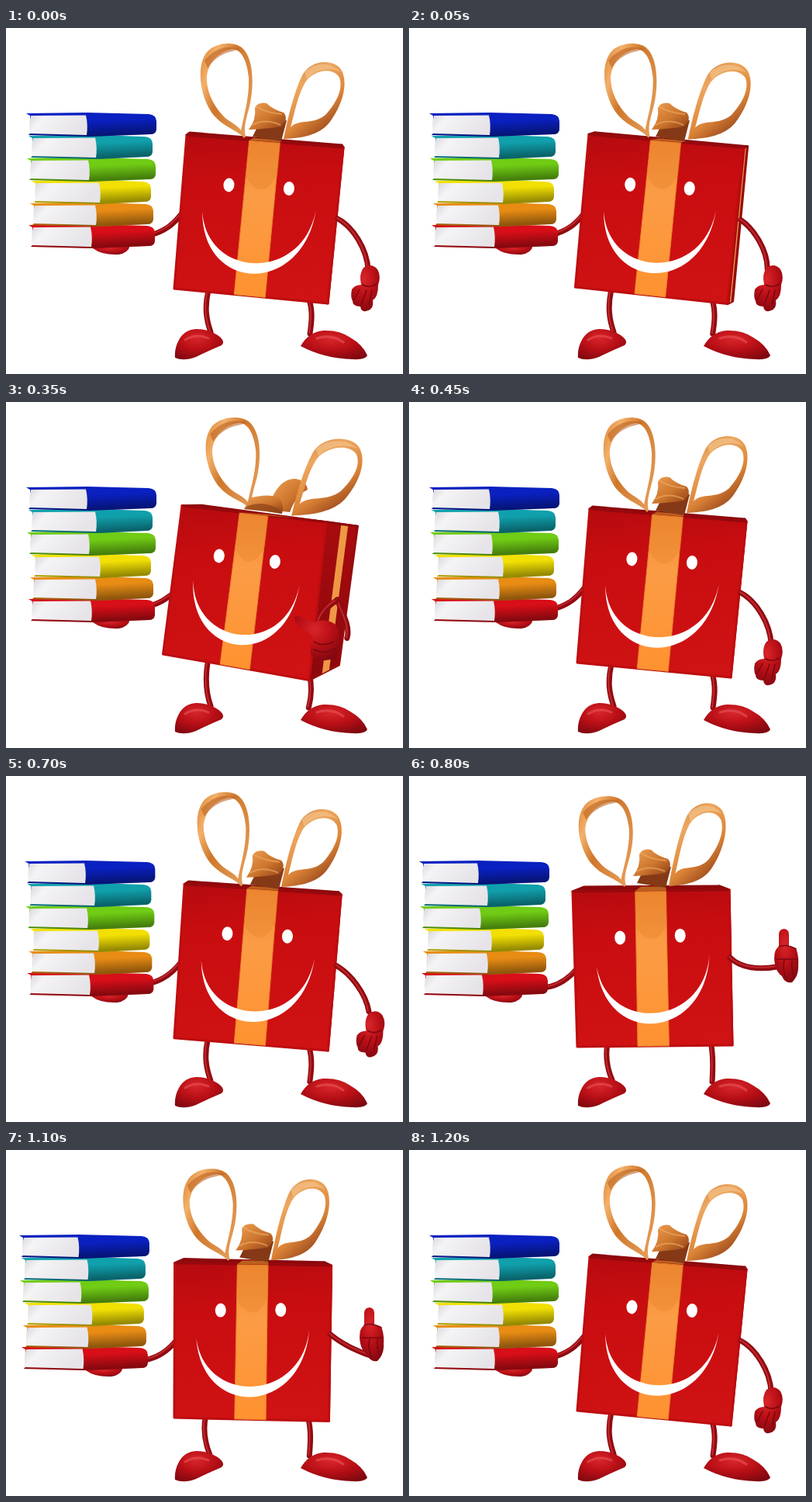
Recreate the animation shown at these times as an HTML page. Size 512 px wide and 446 px high, loop 1850 ms.

```html
<!DOCTYPE html>
<html lang="en">
<head>
<meta charset="utf-8">
<title>Gift box with books</title>
<style>
html, body { margin: 0; width: 100%; height: 100%; overflow: hidden; background: #fff; }
svg { display: block; width: 100vw; height: 100vh; }
</style>
</head>
<body>
<svg viewBox="0 0 512 446">
  <defs>
    <linearGradient id="front" x1="0" y1="0" x2=".1" y2="1">
      <stop offset="0" stop-color="#b50b0f"/><stop offset=".3" stop-color="#c80d10"/><stop offset="1" stop-color="#cf1213"/>
    </linearGradient>
    <linearGradient id="side" x1="0" y1="0" x2="0" y2="1">
      <stop offset="0" stop-color="#a80b0e"/><stop offset="1" stop-color="#8c080b"/>
    </linearGradient>
    <linearGradient id="band" x1="0" y1="0" x2="0" y2="1">
      <stop offset="0" stop-color="#f08a32"/><stop offset=".35" stop-color="#fb9c46"/><stop offset="1" stop-color="#ff9230"/>
    </linearGradient>
    <linearGradient id="loopL" x1="0" y1="0" x2="1" y2=".7">
      <stop offset="0" stop-color="#d9822f"/><stop offset=".25" stop-color="#f3b06a"/><stop offset=".5" stop-color="#cf772b"/><stop offset="1" stop-color="#e39a55"/>
    </linearGradient>
    <linearGradient id="loopR" x1="0" y1="0" x2=".6" y2="1">
      <stop offset="0" stop-color="#c87a34"/><stop offset=".35" stop-color="#eda75f"/><stop offset=".7" stop-color="#dc8538"/><stop offset="1" stop-color="#96441a"/>
    </linearGradient>
    <linearGradient id="knot" x1="0" y1="0" x2="1" y2="1">
      <stop offset="0" stop-color="#eea052"/><stop offset=".55" stop-color="#cc752d"/><stop offset="1" stop-color="#8e3d16"/>
    </linearGradient>
    <linearGradient id="pages" x1="0" y1="0" x2="1" y2=".3">
      <stop offset="0" stop-color="#d9d7dc"/><stop offset=".25" stop-color="#f4f3f5"/><stop offset="1" stop-color="#e6e4e8"/>
    </linearGradient>
    <linearGradient id="shade" x1="0" y1="0" x2=".25" y2="1">
      <stop offset=".45" stop-opacity="0"/><stop offset="1" stop-opacity=".38"/>
    </linearGradient>
    <radialGradient id="skin" cx=".45" cy=".3" r=".75">
      <stop offset="0" stop-color="#d8262a"/><stop offset=".5" stop-color="#b90f16"/><stop offset="1" stop-color="#800810"/>
    </radialGradient>
  </defs>
  <g id="scene"></g>
</svg>
<script>
const LOOP = 1850, STEP = 50;
const scene = document.getElementById('scene');

// box: front corners clockwise, back top corners, back lower right
const rest = {
  box: [233,138, 435,154, 415,355, 217,336, 237,135, 433,151, 415,355],
  armL: [226,240, 216,253, 205,262, 186,267],
  armR: [428,246, 447,256, 466,285, 467,312],
  hand: [0,0], knot: [0,0], books: [0,0],
  loopL: [250,20, 317,142], loopR: [358,43, 436,143],
  legL: [261,338, 256,360, 258,375, 264,392],
  legR: [391,350, 396,366, 394,380, 392,394]
};
const turned = {
  ...rest,
  box: [226,133, 409,155, 387,359, 200,323, 255,133, 457,162, 432,336],
  armL: [211,250, 204,254, 199,258, 186,262],
  armR: [427,256, 430,272, 441,290, 435,303],
  loopL: [258,20, 328,138], loopR: [370,47, 463,147],
  legL: [260,335, 257,355, 258,375, 264,392],
  legR: [391,350, 395,366, 394,380, 390,394]
};
const thumb = {
  box: [211,149, 413,147, 417,347, 217,349, 226,143, 400,142, 417,347],
  armL: [216,249, 205,262, 190,272, 172,273],
  armR: [414,234, 428,248, 452,250, 474,246],
  hand: [50,-20], knot: [-24,-2], books: [-13,-15],
  loopL: [218,26, 288,143], loopR: [335,34, 408,142],
  legL: [256,345, 253,362, 256,378, 262,392],
  legR: [389,343, 393,360, 392,378, 391,394]
};

// start time, share of the turned pose, share of the thumb pose
const keys = [
  [0,0,0], [50,.15,0], [100,.6,0], [150,1,0], [350,.85,0], [400,.4,0], [450,0,0],
  [700,0,.13], [750,0,.6], [800,0,1], [1050,0,.99], [1100,0,.7], [1150,0,.25], [1200,0,0]
];

// left, page end, right, top, colour
const books = [
  [29,111,192,254,'#d80e18'], [31,117,190,226,'#e88c14'], [33,122,187,197,'#f2e004'],
  [27,108,193,168,'#70cc14'], [29,117,189,139,'#10a0ac'], [26,105,194,110,'#0a20c0']
];

const mix = (a, b, k) => a + (b - a) * k;
const path = (d, fill, more = '') => `<path d="${d}" fill="${fill}" ${more}/>`;
const poly = (pts, fill, more = '') => path('M' + pts.join('L') + 'Z', fill, more);
const curve = p => `M${p[0]} ${p[1]}C${p.slice(2)}`;
const limb = p => path(curve(p), 'none', 'stroke="#8f0b12" stroke-width="7" stroke-linecap="round"')
  + path(curve(p), 'none', 'stroke="#c3262b" stroke-width="2" stroke-linecap="round" transform="translate(-1 -1)"');
const move = ([x, y], s) => `<g transform="translate(${x} ${y})">${s}</g>`;

function fit(from, to, s) {
  const sx = (to[2] - to[0]) / (from[2] - from[0]);
  const sy = (to[3] - to[1]) / (from[3] - from[1]);
  return `<g transform="translate(${to[0]} ${to[1]}) scale(${sx} ${sy}) translate(${-from[0]} ${-from[1]})">${s}</g>`;
}

function poseAt(b, c) {
  const out = {};
  for (const k in rest)
    out[k] = rest[k].map((v, i) => v + (turned[k][i] - v) * b + (thumb[k][i] - v) * c);
  return out;
}

function book([l, s, r, y, col], [dx, ds]) {
  l += dx; r += dx; s += ds;
  const cover = `M${l} ${y}L${s} ${y - 1}L${r - 10} ${y + 1}Q${r} ${y + 2} ${r} ${y + 10}V${y + 21}Q${r - 1} ${y + 27} ${r - 8} ${y + 27}L${s + 2} ${y + 30}L${l + 3} ${y + 28}L${l + 5} ${y + 26}V${y + 3}Z`;
  const page = `M${l + 6} ${y + 3}L${s - 2} ${y + 2.5}Q${s + 1} ${y + 15} ${s - 1} ${y + 28}L${l + 5} ${y + 26}Q${l + 3} ${y + 14} ${l + 6} ${y + 3}Z`;
  return path(cover, col) + path(cover, 'url(#shade)') + path(page, 'url(#pages)');
}

function gift(q) {
  const p = [];
  for (let i = 0; i < q.length; i += 2) p.push([q[i], q[i + 1]]);
  const [tl, tr, br, bl, backL, backR, low] = p;
  const on = (a, b, k) => [mix(a[0], b[0], k), mix(a[1], b[1], k)];
  const at = (u, v) => on(on(tl, tr, u), on(bl, br, u), v);
  const edge = c => `stroke="${c}" stroke-width="3" stroke-linejoin="round"`;
  const tilt = Math.atan2(tr[1] - tl[1], tr[0] - tl[0]) * 180 / Math.PI;
  const eye = (u, v) => {
    const [x, y] = at(u, v);
    return `<ellipse rx="7" ry="9" fill="#fff" transform="translate(${x} ${y}) rotate(${tilt})"/>`;
  };
  const smile = `M${at(.14,.485)}C${at(.18,1.01)} ${at(.83,.97)} ${at(.865,.415)}C${at(.82,.885)} ${at(.2,.915)} ${at(.14,.485)}Z`;
  const gloss = `M${at(.4,.24)}Q${at(.52,.4)} ${at(.6,.2)}L${at(.6,0)}L${at(.4,0)}Z`;
  return poly([tr, backR, low, br], 'url(#side)', edge('#960a0d'))
    + poly([on(tr, backR, .48), on(tr, backR, .7), on(br, low, .67), on(br, low, .43)], '#ee9846')
    + poly([tl, backL, backR, tr], '#8c080c', edge('#8c080c'))
    + poly([tl, tr, br, bl], 'url(#front)', edge('#bd0d10'))
    + path(`M${tl}L${tr}`, 'none', 'stroke="#95090d" stroke-width="3"')
    + poly([on(backL, backR, .42), on(backL, backR, .6), at(.6, 0), at(.4, 0)], '#b9601f')
    + poly([at(.4, .005), at(.595, .005), at(.592, 1), at(.39, 1)], 'url(#band)', 'stroke="#e9822b" stroke-width="1"')
    + path(gloss, '#e07b2a', 'opacity=".3"')
    + eye(.295, .3) + eye(.68, .29) + path(smile, '#fff');
}

function bow(p, b) {
  const left = 'M307 142C298 130 274 127 261 102C249 79 246 46 260 30C272 18 295 17 305 26C320 40 320 76 314 101C310 117 306 128 309 140ZM303 132C308 108 314 88 313 64C311 44 305 29 293 27C276 29 262 42 259 62C258 83 269 103 284 117C294 124 300 127 303 132Z';
  const right = 'M358 143C363 117 371 84 382 61C393 40 424 39 433 55C442 73 433 101 417 122C404 138 382 142 358 143ZM367 128C378 116 397 126 413 111C427 95 435 78 430 64C421 49 396 55 386 70C376 87 372 110 367 128Z';
  const loops = fit(rest.loopL, p.loopL,
      path(left, 'url(#loopL)', 'fill-rule="evenodd"')
      + path('M256 42C268 27 284 21 303 27L292 30C281 32 269 38 260 52Z', '#bd6424', 'opacity=".6"'))
    + fit(rest.loopR, p.loopR,
      path(right, 'url(#loopR)', 'fill-rule="evenodd"')
      + path('M385 57C396 45 417 42 432 57C417 50 400 52 388 66Z', '#f4c088', 'opacity=".7"'));
  if (b > .5)
    return path('M343 124C350 108 360 98 374 99Q388 102 389 113Q374 120 366 142L348 140Z', 'url(#knot)')
      + loops
      + path('M307 138L314 124Q334 118 350 122Q360 130 356 144Q332 140 307 138Z', 'url(#knot)')
      + path('M312 134Q332 126 354 139L355 144Q330 140 307 138Z', '#8e4217', 'opacity=".7"');
  const knot = path('M318 140L327 122L362 119L355 146Z', '#853916')
    + path('M313 131Q323 118 321 103Q325 95 336 97Q344 105 358 109Q365 117 355 127Q336 130 313 131Z', 'url(#knot)')
    + path('M322 101Q337 110 356 111M318 125Q334 116 354 125', 'none', 'stroke="#f1ae68" stroke-width="2" opacity=".6"');
  return loops + move(p.knot, knot);
}

function hand(p, b, c) {
  const skin = 'url(#skin)', line = 'stroke="#7a0710" stroke-width="1.5" stroke-linecap="round"';
  if (b > .5)
    return limb([425,257, 417,261, 404,275, 403,285])
      + path('M372 281Q371 275 378 276L397 284Q407 279 418 283Q430 287 430 304Q430 319 424 330Q411 336 399 331Q390 326 393 314Q398 305 392 299L378 290Z', skin)
      + path('M397 309Q408 316 423 309M397 319Q409 326 425 318', 'none', line);
  if (c > .5)
    return move([p.hand[0] - 50, p.hand[1] + 20],
      path('M471 236Q471 223 477 220V203Q478 197 484 197Q490 198 490 204V219L499 222Q503 232 502 244Q503 257 494 266Q485 268 481 258Q472 252 471 236Z', skin)
      + path('M477 220Q487 216 499 223M474 236H500M484 237Q481 250 487 263M494 238Q493 252 497 259', 'none', line));
  return move(p.hand,
    path('M461 309Q471 302 479 311Q484 320 480 331Q480 347 473 351Q475 363 464 365Q458 366 457 359Q447 359 447 352Q444 347 446 337Q450 331 458 331Q455 317 461 309Z', skin)
    + path('M460 331Q468 336 478 330M456 337L449 350M465 338L458 357M472 338L468 357', 'none', line));
}

function draw(b, c) {
  const p = poseAt(b, c), skin = 'url(#skin)';
  const shoes = path('M218 425Q217 413 223 402Q230 389 245 388Q261 388 273 396Q284 404 278 409Q257 418 245 424Q229 430 218 425Z', skin)
    + path('M380 410Q390 392 409 390Q430 389 444 399Q460 408 466 422Q464 428 447 427Q410 426 380 410Z', skin)
    + path('M231 402Q245 393 261 400M401 400Q420 394 435 405', 'none', 'stroke="#e8555a" stroke-width="3" stroke-linecap="round" opacity=".6"');
  const palm = path('M112 284Q124 293 145 292Q158 290 160 280H112Z', skin);
  scene.innerHTML = limb(p.legL) + limb(p.legR) + shoes
    + limb(p.armL) + move([p.books[0], 0], palm)
    + books.map(k => book(k, p.books)).join('')
    + gift(p.box) + bow(p, b) + limb(p.armR) + hand(p, b, c);
}

let shown = null;
function frame(now) {
  const t = Math.floor((now % LOOP) / STEP) * STEP;
  const key = keys.findLast(k => k[0] <= t);
  if (key !== shown) {
    shown = key;
    draw(key[1], key[2]);
  }
  requestAnimationFrame(frame);
}
let start;
requestAnimationFrame(function begin(now) {
  start ??= now;
  frame(0);
  const tick = n => { frameAt(n - start); requestAnimationFrame(tick); };
  const frameAt = frameOnce;
});
function frameOnce() {}
</script>
</body>
</html>
```
